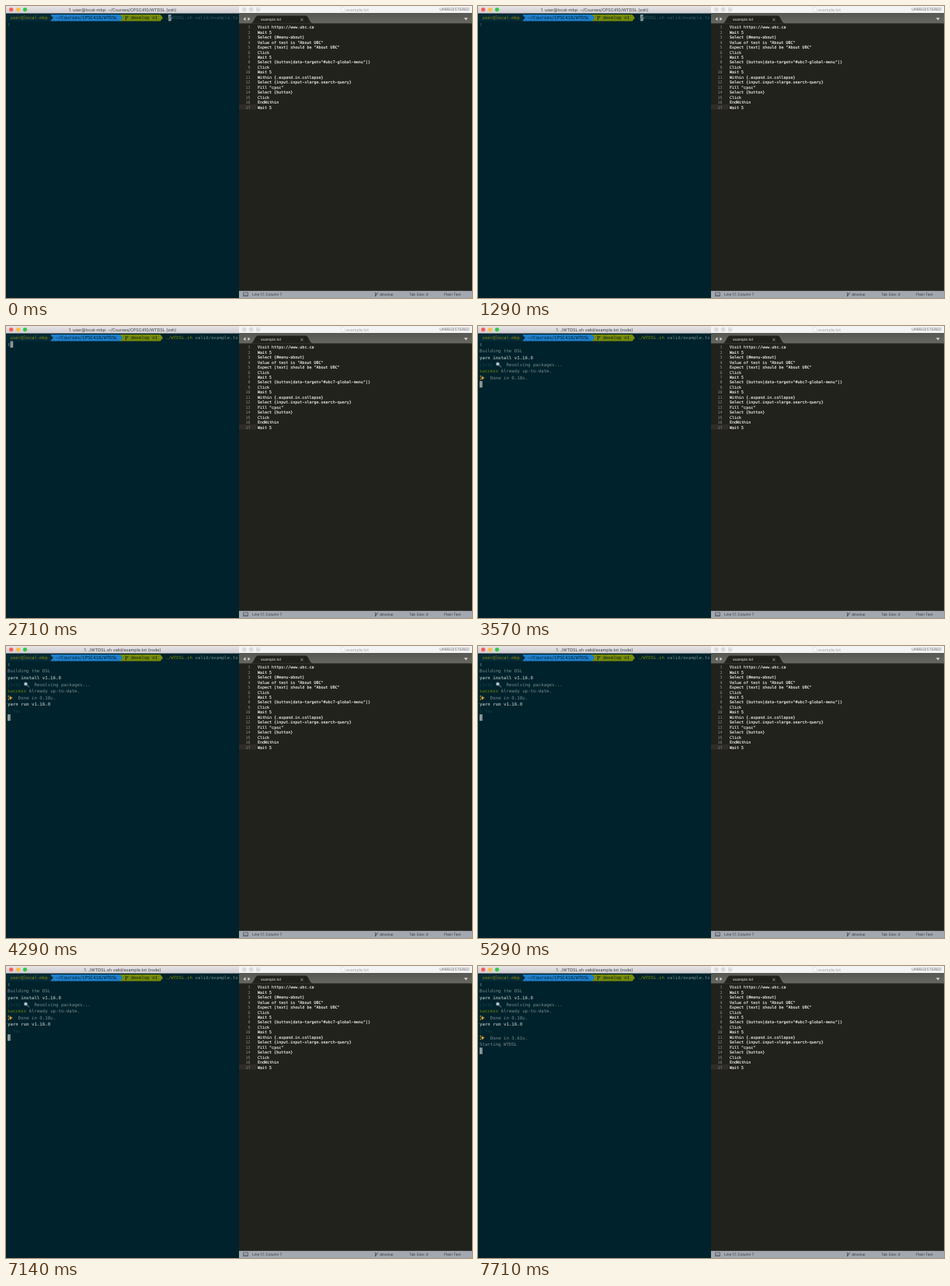
Recreate the animation shown at these times as an HTML page. Size 600x377 px, loop 8 s.

```html
<!DOCTYPE html>
<html lang="en">
<head>
<meta charset="utf-8">
<title>Terminal and editor</title>
<style>
  html, body { margin: 0; width: 100%; height: 100%; overflow: hidden; background: #00222c; }
  svg { display: block; width: 100vw; height: 100vh; }
  text { white-space: pre; text-rendering: geometricPrecision; }
  .mono { font-family: "DejaVu Sans Mono", monospace; }
  .ui { font-family: Inter, "Liberation Sans", sans-serif; }
</style>
</head>
<body>
<svg id="stage" viewBox="0 0 600 377" preserveAspectRatio="none">
  <defs>
    <linearGradient id="bar" x2="0" y2="1">
      <stop stop-color="#e6e4e6"/><stop offset="1" stop-color="#d0ced0"/>
    </linearGradient>
    <linearGradient id="tabs" x2="0" y2="1">
      <stop stop-color="#565752"/><stop offset="1" stop-color="#66675f"/>
    </linearGradient>
    <path id="branch" d="M-1.2-2V2M1.2-1.4C1.2.4-1.2 0-1.2 1.4M-1.2-2h.1M-1.2 2h.1M1.2-1.6h.1"
      fill="none" stroke-width=".8" stroke-linecap="round"/>
  </defs>
</svg>
<script>
const LOOP = 8000;
const COL = 3.45, ROW = 8.58, LEFT = 2, TOP = 11;
const C = {
  bg: '#00222c', fg: '#788b8c', bold: '#9aa9a9', dim: '#174650', hint: '#395a63',
  olive: '#95860a', green: '#788b06', blue: '#1e7fca', black: '#042b36', cursor: '#879899'
};
const stage = document.getElementById('stage');

function add(parent, tag, attrs, content) {
  const node = document.createElementNS('http://www.w3.org/2000/svg', tag);
  for (const key in attrs) node.setAttribute(key, attrs[key]);
  if (content !== undefined) node.textContent = content;
  parent.appendChild(node);
  return node;
}
const rect = (x, y, width, height, fill, parent = stage) =>
  add(parent, 'rect', { x, y, width, height, fill });
const path = (d, fill, parent = stage) => add(parent, 'path', { d, fill });
const label = (x, y, size, fill, content, extra = {}) =>
  add(stage, 'text', { class: 'ui', x, y, 'font-size': size, fill, ...extra }, content);
const colX = col => LEFT + col * COL;
const rowY = row => TOP + row * ROW;
const cell = (parent, col, row, fill, content, weight = 400) =>
  add(parent, 'text', {
    class: 'mono', x: colX(col), y: rowY(row) + 6.3, 'font-size': 5.73, fill, 'font-weight': weight
  }, content);
const group = () => add(stage, 'g', {});
const branch = (x, y, stroke) =>
  add(stage, 'use', { href: '#branch', transform: `translate(${x} ${y})`, stroke });

// Terminal window
rect(0, 0, 300, 377, C.bg);
rect(0, 0, 300, 9.5, 'url(#bar)');
['#fc5b57', '#fdbc40', '#34c84a'].forEach((fill, i) =>
  add(stage, 'circle', { cx: 6.7 + i * 8.9, cy: 4.6, r: 2.6, fill }));
const title = label(150, 6.5, 5.4, '#3d3c3d', '', { 'text-anchor': 'middle' });

function segment(from, to, fill) {
  const x = colX(to), y = rowY(0);
  path(`M${from} ${y}H${x}l${COL} ${ROW / 2}l${-COL} ${ROW / 2}H${from}Z`, fill);
}
segment(colX(42), 57, C.green);
segment(colX(16), 42, C.blue);
segment(0, 16, C.black);
cell(stage, 1, 0, C.olive, 'user@local-mbp');
cell(stage, 18, 0, C.bg, '~/Courses/CPSC410/WTDSL');
branch(colX(44.5), rowY(0) + 4.3, C.bg);
cell(stage, 46, 0, C.bg, 'develop ⊙1');

const cursor = rect(0, 0, COL + .3, ROW - .2, C.cursor);

// Command line: suggested, then accepted
const hint = group(), typed = group();
cell(hint, 59, 0, C.fg, '.');
cell(hint, 60, 0, C.bg, '/');
cell(hint, 61, 0, C.hint, 'WTDSL.sh valid/example.tx');
cell(hint, 0, 1, C.hint, 't');
cell(typed, 59, 0, C.green, './WTDSL.sh');
cell(typed, 70, 0, C.fg, 'valid/example.tx');
cell(typed, 0, 1, C.fg, 't');

function sparkles(g, row) {
  const star = (x, y, r) => {
    const k = r * .28;
    path(`M${x} ${y - r}L${x + k} ${y - k}L${x + r} ${y}L${x + k} ${y + k}` +
      `L${x} ${y + r}L${x - k} ${y + k}L${x - r} ${y}L${x - k} ${y - k}Z`, '#e9ac38', g);
  };
  const y = rowY(row) + 4.3;
  star(5.9, y + .2, 3);
  star(3.2, y - 2, 1.4);
  star(3.3, y + 2.2, 1.3);
}
function lens(g, row) {
  const y = rowY(row) + 3.7;
  add(g, 'path', { d: `M27 ${y + 1.3}l2.6 2.6`, stroke: '#59666a', 'stroke-width': 1.3, 'stroke-linecap': 'round' });
  add(g, 'circle', { cx: 25.4, cy: y, r: 2.1, fill: '#b9d2da', stroke: '#76858a', 'stroke-width': .8 });
}

// Output lines: [time, draw]
const output = [
  [3000, (g, r) => cell(g, 0, r, C.fg, 'Building the DSL')],
  [3290, (g, r) => cell(g, 0, r, C.bold, 'yarn install v1.16.0', 700)],
  [3430, (g, r) => {
    cell(g, 0, r, C.dim, '[1/4]');
    lens(g, r);
    cell(g, 10, r, C.fg, 'Resolving packages...');
  }],
  [3430, (g, r) => {
    cell(g, 0, r, C.green, 'success');
    cell(g, 8, r, C.fg, 'Already up-to-date.');
  }],
  [3570, (g, r) => { sparkles(g, r); cell(g, 4, r, C.fg, 'Done in 0.18s.'); }],
  [3860, (g, r) => cell(g, 0, r, C.bold, 'yarn run v1.16.0', 700)],
  [3860, (g, r) => cell(g, 0, r, C.dim, '$ tsc')],
  [7430, (g, r) => { sparkles(g, r); cell(g, 4, r, C.fg, 'Done in 3.61s.'); }],
  [7570, (g, r) => cell(g, 0, r, C.fg, 'Starting WTDSL')]
].map(([time, draw], i) => {
  const g = group();
  draw(g, i + 2);
  return { time, g };
});

// Editor window
rect(300, 0, 300, 377, '#21221c');
rect(300, 0, 300, 9.2, '#f3f3f3');
for (let i = 0; i < 3; i++)
  add(stage, 'circle', { cx: 306.7 + i * 8.9, cy: 4.6, r: 2.5, fill: '#dcdcdc', stroke: '#cbcbcb', 'stroke-width': .4 });
rect(432, 2, 4, 5.2, '#fafafa').setAttribute('stroke', '#e3e3e3');
label(438, 6.5, 5.3, '#a4a4a4', 'example.txt');
label(597, 6.4, 5.1, '#666', 'UNREGISTERED', { 'text-anchor': 'end' });

rect(300, 9.2, 300, 13.2, 'url(#tabs)');
path('M315 22.5C320 21.5 320 12.5 324 12.5H386C390 12.5 390 21.5 395 22.5Z', '#21221c');
path('M308.5 14.5V19L305.5 16.75Z M311.5 14.5V19L314.5 16.75Z M589.8 15.2H594.6L592.2 18.4Z', '#d5d6d2');
label(328, 19, 4.8, '#e6e6e2', 'example.txt');
add(stage, 'path', { d: 'M379.3 16l3.2 3.2m0-3.2l-3.2 3.2', stroke: '#a8a9a4', 'stroke-width': .8 });

rect(300, 127.1, 22.5, 6.6, '#302d27');
`Visit https://www.ubc.ca
Wait 5
Select {#menu-about}
Value of test is "About UBC"
Expect [text] should be "About UBC"
Click
Wait 5
Select {button[data-target="#ubc7-global-menu"]}
Click
Wait 5
Within {.expand.in.collapse}
Select {input.input-xlarge.search-query}
Fill "cpsc"
Select {button}
Click
EndWithin
Wait 5`.split('\n').forEach((line, i) => {
  const code = { class: 'mono', y: 29.3 + i * 6.45, 'font-size': 5.03 };
  add(stage, 'text', { ...code, x: 314.5, fill: '#8f908a', 'text-anchor': 'end' }, i + 1);
  add(stage, 'text', { ...code, x: 324, fill: '#f8f8f2', stroke: '#f8f8f2', 'stroke-width': .12 }, line);
});

rect(300, 367.8, 300, 9.2, '#a3a7b0');
add(stage, 'path', { d: 'M305.5 370h6v4.6h-6zM305.5 373.2h6', fill: 'none', stroke: '#4b4f5a', 'stroke-width': .7 });
const status = (x, content) => label(x, 374.1, 4.7, '#353941', content);
status(317, 'Line 17, Column 7');
branch(477, 372.4, '#353941');
status(481, 'develop');
status(519, 'Tab Size: 4');
status(564, 'Plain Text');

const show = (node, on) => node.setAttribute('visibility', on ? 'visible' : 'hidden');

function draw(t) {
  const accepted = t >= 1570, running = t >= 3000;
  show(hint, !accepted);
  show(typed, accepted);
  let lines = 0;
  for (const { time, g } of output) {
    show(g, t >= time);
    if (t >= time) lines++;
  }
  const [col, row] = running ? [0, lines + 2] : accepted ? [1, 1] : [60, 0];
  cursor.setAttribute('x', colX(col));
  cursor.setAttribute('y', rowY(row));
  title.textContent = t >= 3140
    ? '1. ./WTDSL.sh valid/example.txt (node)'
    : '1. user@local-mbp: ~/Courses/CPSC410/WTDSL (zsh)';
}

const start = performance.now();
function tick() {
  draw((performance.now() - start) % LOOP);
  requestAnimationFrame(tick);
}
tick();
</script>
</body>
</html>
```
